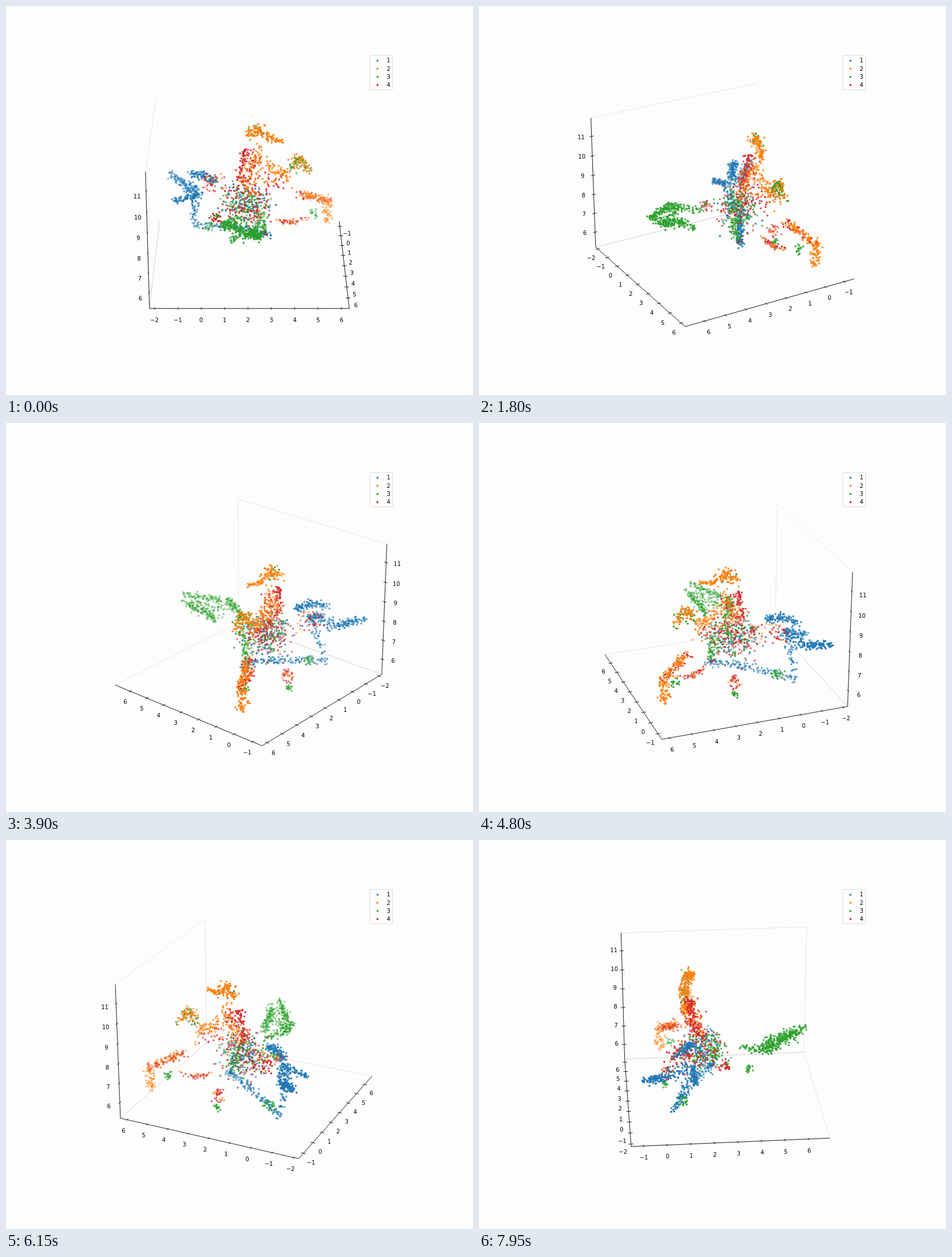
Animation of 820 by 683 pixels, one loop 8000 ms. Source, as an HTML page with a canvas:

```html
<!DOCTYPE html>
<html lang="en">
<head>
<meta charset="utf-8">
<title>Rotating 3D scatter</title>
<style>
html, body { margin: 0; width: 100%; height: 100%; overflow: hidden; background: #fdfdfd; }
svg, canvas { position: absolute; left: 0; top: 0; width: 820px; height: 683px; }
text { font: 10px "DejaVu Sans", sans-serif; fill: #000; }
</style>
</head>
<body>
<svg viewBox="0 0 820 683">
  <path id="panes" fill="none" stroke="#000" stroke-opacity=".09"/>
  <path id="axes" fill="none" stroke="#000" stroke-width=".9"/>
  <g id="labels" text-anchor="middle"></g>
  <rect x="638.7" y="87" width="40" height="60" rx="2" fill="#fff" fill-opacity=".8" stroke="#ccc" stroke-opacity=".8"/>
  <g id="legend"></g>
</svg>
<canvas id="dots" width="820" height="683"></canvas>
<script>
const STEP_MS = 150, LOOP_MS = 8000, TURN = 5 * Math.PI / 180;
const ELEV = 25 * Math.PI / 180, CE = Math.cos(ELEV), SE = Math.sin(ELEV);
const CX = 427.4, CY = 337.8, DIST = 2843;
const A = 169.2, H = 126.9;           // half width and half height of the box
const PAD = 13.8, PAD_Z = 11.1, TICK = 4;
const COLORS = { B: '#1f77b4', O: '#ff7f0e', G: '#2ca02c', R: '#d62728' };
const $ = id => document.getElementById(id);

let seed = 20417;
function rand() {
  seed = (seed + 0x6D2B79F5) | 0;
  let t = Math.imul(seed ^ (seed >>> 15), 1 | seed);
  t = (t + Math.imul(t ^ (t >>> 7), 61 | t)) ^ t;
  return ((t ^ (t >>> 14)) >>> 0) / 4294967296;
}
const gauss = () => (rand() + rand() + rand() - 1.5) * 2;

// Scatter dots along a strand; arch lifts its middle, mix gives the share of each colour.
const clouds = { B: [], O: [], G: [], R: [] };
function strand(mix, from, to, { arch = 0, width = 4, density = 1.2 } = {}) {
  const count = density * Math.hypot(...from.map((v, k) => to[k] - v));
  for (let i = 0; i < count; i++) {
    const f = rand(), dot = from.map((v, k) => v + (to[k] - v) * f + gauss() * width);
    dot[2] += arch * Math.sin(Math.PI * f);
    clouds[mix[Math.floor(rand() * mix.length)]].push(dot);
  }
}

// mixed core
strand('BGR', [-40, -22, -24], [-32, 8, -34], { width: 18, density: 10 });
strand('G', [-8, 18, -36], [-17, 30, -74]);
strand('RRRG', [2, -62, -36], [-4, -52, -38], { density: 2.5 });
strand('RRRO', [-92, -80, 2], [-75, -55, -12], { width: 11 });

// blue wings and the arc below them
strand('B', [-142, -146, -18], [-108, -110, -27], { density: 1.7 });
strand('B', [-88, -106, 6], [-55, -62, 7], { arch: 7, density: 1.7 });
strand('B', [-58, -134, -31], [-58, -92, -21], { width: 3, density: 1.6 });
strand('B', [-58, -92, -21], [-108, -110, -27], { width: 6 });
strand('B', [-62, -98, -30], [-93, -100, -98], { density: .6 });
strand('B', [-93, -100, -98], [-18, 30, -76], { arch: 6, density: .7 });
strand('BBBR', [-21, 26, -77], [-15, 34, -77], { width: 3, density: 3 });
strand('G', [-72, -82, -93], [-78, -70, -91], { density: 1.8 });

// crown, column and arch
strand('OOOOOOOOG', [-65, -3, 92], [-56, 32, 95], { arch: 12, width: 5, density: 2.4 });
strand('O', [-56, 32, 95], [-45, 58, 88], { width: 2.5, density: 1 });
strand('OOOR', [-60, 18, 72], [-50, 2, 15], { width: 7, density: 1.4 });
strand('R', [-61, -6, 72], [-50, -18, 15], { density: .9 });
strand('RRO', [-53, -17, 24], [-35, 6, -8], { width: 7, density: 1.4 });
strand('RO', [-45, 20, 5], [-60, 60, 5], { width: 12, density: .8 });
strand('O', [-62, 35, 36], [-60, 70, 14], { width: 5 });
strand('OOG', [-60, 68, 15], [-60, 106, 24], { arch: 26, width: 5, density: 2.6 });

// tail, thread and tuft
strand('OOR', [-74, 90, -26], [-103, 144, -52], { density: 1.7 });
strand('O', [-103, 144, -52], [-104, 143, -94], { width: 5, density: 1.4 });
strand('G', [-84, 113, -70], [-88, 119, -70], { density: 2 });
strand('RRRO', [-54, 50, -68], [-66, 104, -70], { arch: -6, width: 2.5, density: .8 });
strand('ORR', [-95, 20, -74], [-99, 8, -90], { width: 5, density: 1.5 });
strand('G', [-102, 18, -100], [-102, 10, -106], { width: 2.5, density: 1.6 });

// green leaf
strand('G', [147, 8, -1], [82, -40, -10], { width: 3, density: .9 });
strand('G', [86, -42, -13], [58, -36, -19], { density: 2.2 });
strand('G', [137, 18, -9], [76, 4, -28], { density: 1.7 });
strand('G', [130, 0, -8], [80, -20, -24], { width: 8, density: 1.1 });
strand('G', [58, -36, -19], [35, -15, -20], { density: .7 });
strand('G', [48, -28, -58], [40, -32, -61], { width: 3, density: 1.7 });

let ca = 1, sa = 0;
function project(x, y, z) {
  const right = y * ca - x * sa, near = x * ca + y * sa;
  const depth = near * CE + z * SE, k = DIST / (DIST - depth);
  return [CX + right * k, CY - (z * CE - near * SE) * k, depth];
}
const pt = p => project(...p).slice(0, 2).map(v => v.toFixed(2)).join(' ');
const line = (...ps) => 'M' + ps.map(pt).join('L');

function svg(tag, parent, attrs = {}) {
  const el = document.createElementNS('http://www.w3.org/2000/svg', tag);
  for (const k in attrs) el.setAttribute(k, attrs[k]);
  return parent.appendChild(el);
}
Object.values(COLORS).forEach((fill, i) => {
  const cy = 96 + i * 14.3;
  svg('circle', $('legend'), { cx: 652.3, cy, r: 1.8, fill });
  svg('text', $('legend'), { x: 668.6, y: Math.round(cy + 3.2) }).textContent = i + 1;
});

function ticks(first, last, min, max, half) {
  const list = [];
  for (let v = first; v <= last; v++) {
    const el = svg('text', $('labels'));
    el.textContent = v < 0 ? '\u2212' + -v : v;
    list.push({ el, at: ((v - min) / (max - min) * 2 - 1) * half });
  }
  return list;
}
const xTicks = ticks(-1, 6, -1.51, 6.93, A);
const yTicks = ticks(-2, 6, -2.22, 6.34, A);
const zTicks = ticks(6, 11, 5.19, 11.93, H);

function place(el, p) {
  const [x, y] = project(...p);
  el.setAttribute('x', x.toFixed(2));
  el.setAttribute('y', Math.round(y + 6.8));
}

function drawBox() {
  const sx = ca >= 0 ? 1 : -1, sy = sa >= 0 ? 1 : -1;   // sides facing the viewer
  const nx = sx * A, ny = sy * A, fy = -ny;
  $('panes').setAttribute('d',
    line([-A, fy, -H], [A, fy, -H], [A, fy, H], [-A, fy, H]) +
    line([-A, -A, -H], [A, -A, -H], [A, A, -H], [-A, A, -H]));

  let d = line([-A, ny, -H], [A, ny, -H]) + line([nx, -A, -H], [nx, A, -H]) + line([nx, fy, -H], [nx, fy, H]);
  for (const { el, at } of xTicks) {
    d += line([at, ny - TICK, -H], [at, ny + TICK, -H]);
    place(el, [at, ny + sy * PAD, -H - PAD_Z]);
  }
  for (const { el, at } of yTicks) {
    d += line([nx - TICK, at, -H], [nx + TICK, at, -H]);
    place(el, [nx + sx * PAD, at, -H - PAD_Z]);
  }
  for (const { el, at } of zTicks) {
    d += line([nx - TICK, fy, at], [nx + TICK, fy, at]);
    place(el, [nx + sx * PAD, fy - sy * PAD, at]);
  }
  $('axes').setAttribute('d', d);
}

const ctx = $('dots').getContext('2d');
function drawDots() {
  ctx.clearRect(0, 0, 820, 683);
  const layers = Object.keys(clouds).map(kind => {
    const pts = clouds[kind].map(p => project(...p)).sort((a, b) => a[2] - b[2]);
    return { kind, pts, far: pts[0][2], near: pts[pts.length - 1][2] };
  }).sort((a, b) => a.near - b.near);
  for (const { kind, pts, far, near } of layers) {
    ctx.fillStyle = COLORS[kind];
    for (const [x, y, depth] of pts) {
      ctx.globalAlpha = .45 + .55 * (depth - far) / (near - far);
      ctx.beginPath();
      ctx.arc(x, y, 1.8, 0, 7);
      ctx.fill();
    }
  }
}

let shown = -1;
const start = performance.now();
function tick() {
  const step = Math.floor((performance.now() - start) % LOOP_MS / STEP_MS);
  if (step !== shown) {
    shown = step;
    ca = Math.cos(step * TURN);
    sa = Math.sin(step * TURN);
    drawBox();
    drawDots();
  }
  requestAnimationFrame(tick);
}
tick();
</script>
</body>
</html>
```
